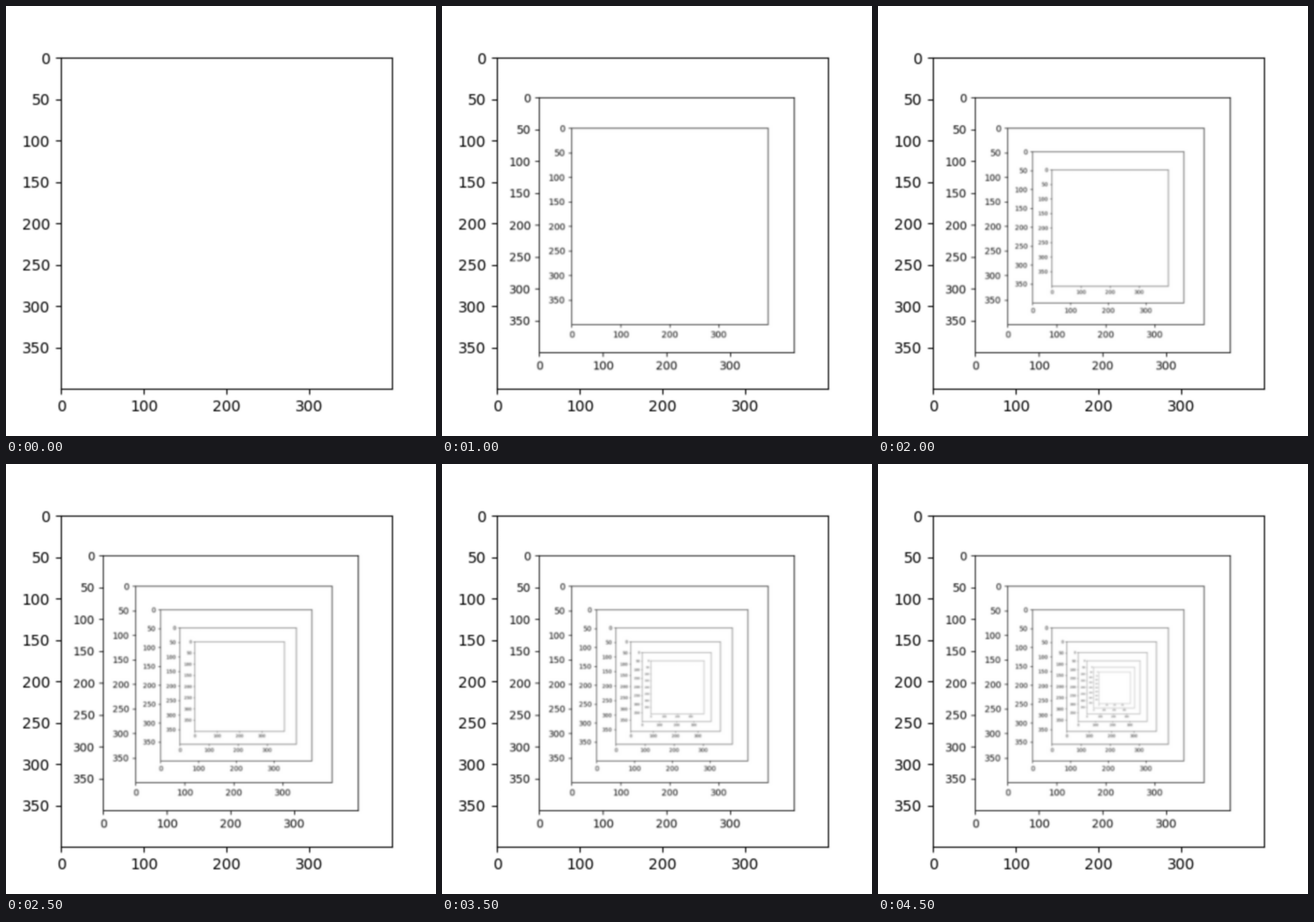
Animation, 748 px wide and 748 px high, one loop 5 s. Source, as a matplotlib script:

```python
import numpy as np
import matplotlib.pyplot as plt
from matplotlib.animation import FuncAnimation

SIZE = 400          # side of the small plot that gets nested, in pixels
LEVELS = 10
STAGE_DPI, PLOT_DPI = 187, 100

fig = plt.figure(figsize=(4, 4), dpi=STAGE_DPI)


def nested_plots():
    """Plot a blank image, then keep plotting a picture of the last plot."""
    fig.set_dpi(PLOT_DPI)
    ax = fig.add_subplot()
    image = ax.imshow(np.full((SIZE, SIZE, 3), 255, np.uint8))
    shots = []
    for _ in range(LEVELS):
        fig.canvas.draw()
        shot = np.array(fig.canvas.buffer_rgba())[..., :3]
        shots.append(shot)
        image.set_data(shot)
    ax.remove()
    fig.set_dpi(STAGE_DPI)
    return shots


shots = nested_plots()

stage = fig.add_axes([0, 0, 1, 1])
stage.axis("off")
view = stage.imshow(shots[0], interpolation="bicubic", aspect="auto")


def update(i):
    view.set_data(shots[i % LEVELS])
    return [view]


anim = FuncAnimation(fig, update, frames=LEVELS, interval=500,
                     repeat=True, repeat_delay=0)
plt.show()
```
